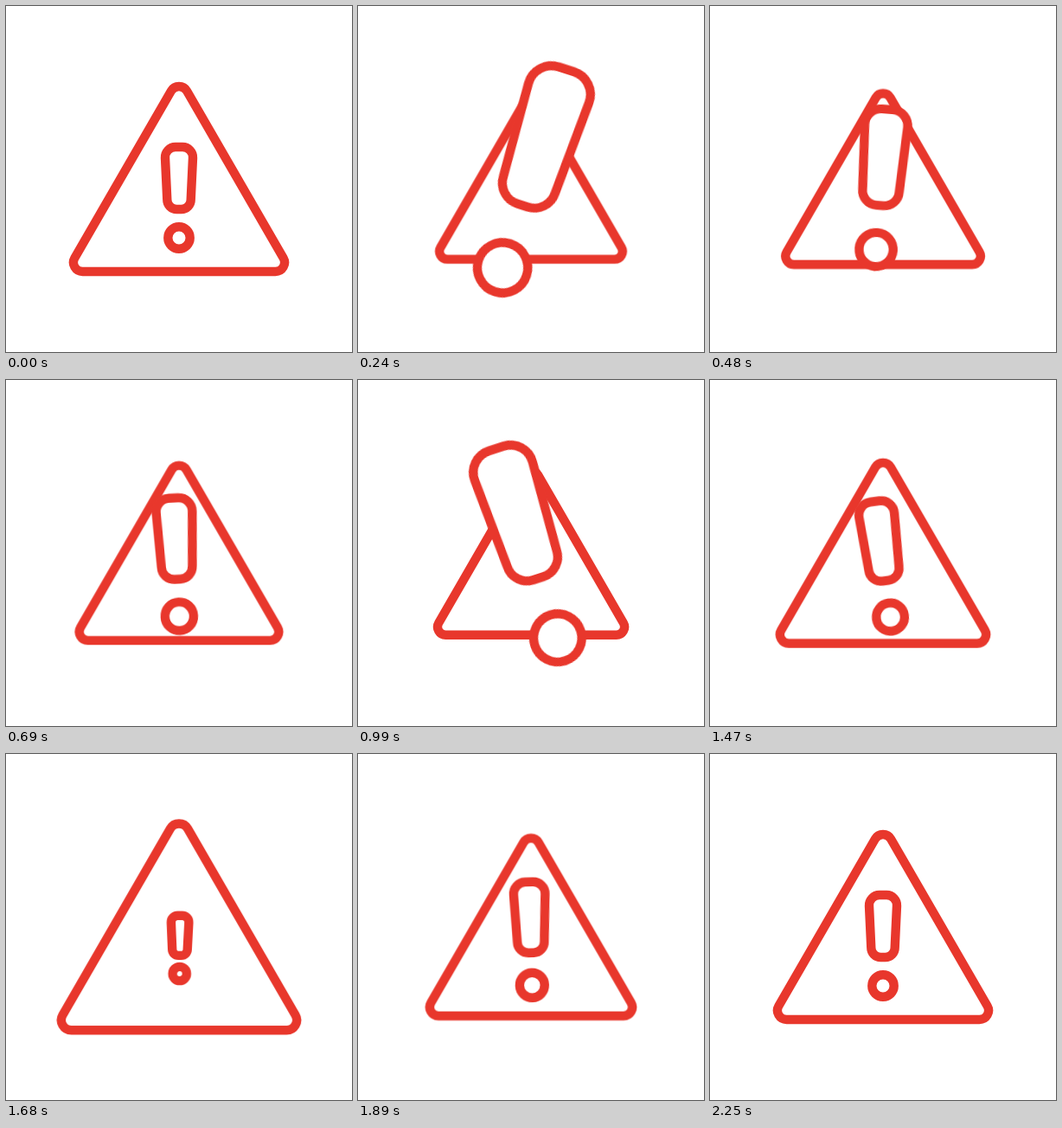
Write an HTML page without scripts that moves like this. It is 400 px wide and 400 px high and loops after 2.28 s.

```html
<!DOCTYPE html>
<html lang="en">
<head>
<meta charset="utf-8">
<title>Warning sign</title>
<style>
  html, body { margin: 0; width: 100%; height: 100%; overflow: hidden; background: #fff; }
  svg { display: block; width: 100%; height: 100%; }

  .outline {
    fill: #fff;
    stroke: #e8372c;
    stroke-width: 10.4;
    stroke-linejoin: round;
    vector-effect: non-scaling-stroke;
  }

  .sign, .mark {
    animation: 2280ms cubic-bezier(.33, 0, .6, 1) infinite;
  }
  .sign { transform-origin: 200px 200px; animation-name: squeeze; }
  .mark { transform-origin: 0 0; animation-name: swing; }

  @keyframes squeeze {
    0%, 98.68%, 100% { transform: scale(1); }
    12.8%  { transform: scale(.858); }
    26.32% { transform: scale(.951); }
    50%    { transform: scale(.873); animation-timing-function: cubic-bezier(.76, 0, .76, 1); }
    72.37% { transform: scale(1.122); }
    84.21% { transform: scale(.956); }
  }

  @keyframes swing {
    0%, 98.68%, 100% { transform: translate(200px, 222px) rotate(0deg) scale(1); }
    12.8%  { transform: translate(199.4px, 200.8px) rotate(19deg) scale(2.38); }
    26.32% { transform: translate(197.2px, 214.5px) rotate(-1.2deg) scale(1.21); }
    50%    { transform: translate(200.2px, 200px) rotate(-21deg) scale(2.37); animation-timing-function: cubic-bezier(.62, 0, .62, 1); }
    72.37% { transform: translate(201px, 225px) rotate(.5deg) scale(.62); }
    84.21% { transform: translate(199.7px, 214.8px) rotate(-1.8deg) scale(1.15); }
  }
</style>
</head>
<body>
<svg viewBox="0 0 400 400">
  <g class="sign">
    <path class="outline" d="M190.9 98.25A10.5 10.5 0 0 1 209.1 98.25L320.6 291.25A10.5 10.5 0 0 1 311.5 307H88.5A10.5 10.5 0 0 1 79.4 291.25Z"/>
  </g>
  <g class="mark">
    <path class="outline" d="M-4-59H4A12 12 0 0 1 16-46.4L13.7 2A11 11 0 0 1 2.7 13H-2.7A11 11 0 0 1-13.7 2L-16-46.4A12 12 0 0 1-4-59Z"/>
    <circle class="outline" cy="46" r="12.7"/>
  </g>
</svg>
</body>
</html>
```
